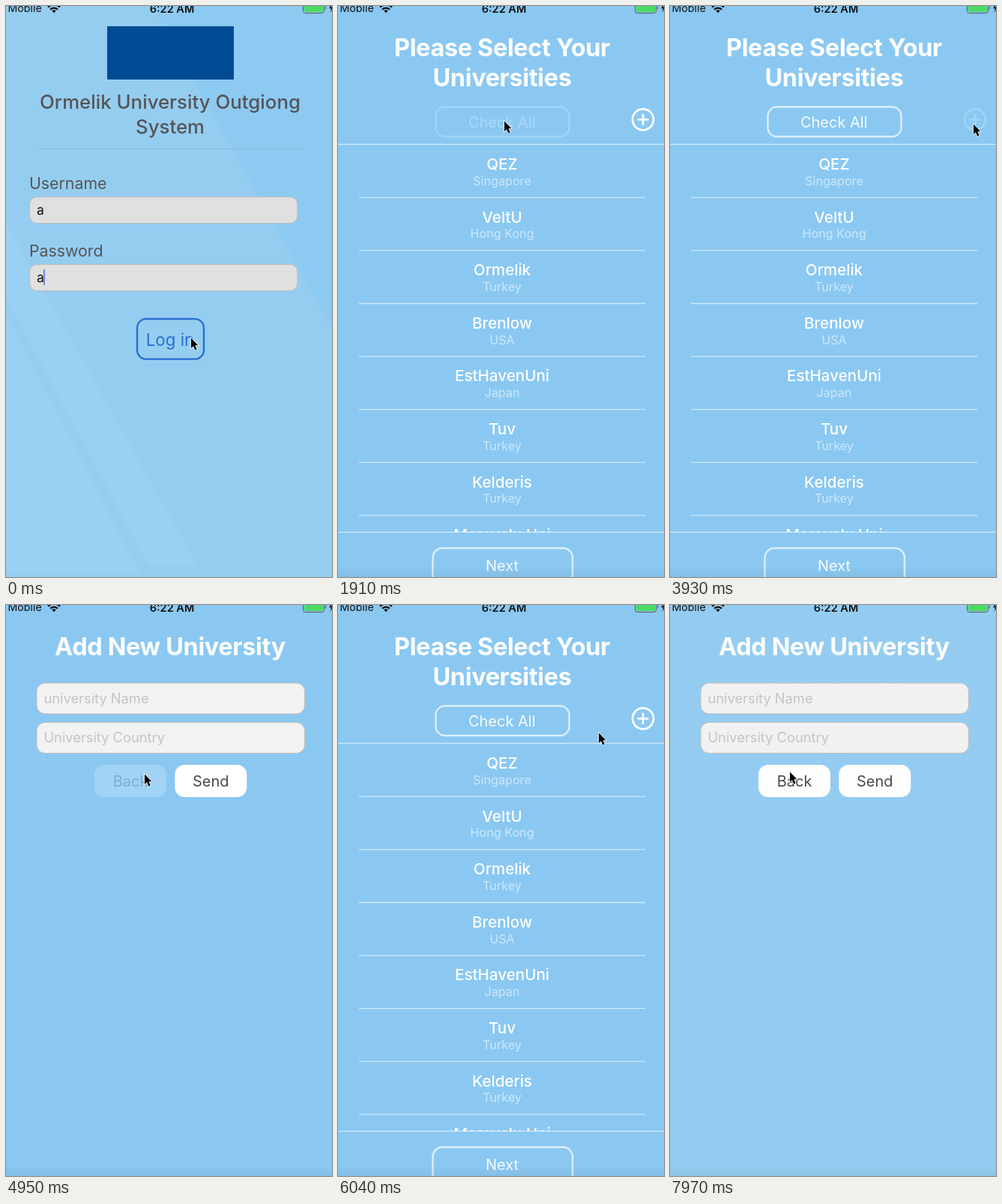
Recreate the animation shown at these times as an HTML page. Size 435x761 px, loop 8000 ms.

```html
<!DOCTYPE html>
<html lang="en">
<head>
<meta charset="utf-8">
<title>University picker</title>
<style>
  html, body { margin: 0; height: 100%; overflow: hidden; background: #8ac8f2; }
  svg { display: block; width: 100vw; height: 100vh; font-family: Inter, Roboto, sans-serif; }
</style>
</head>
<body>
<svg id="stage" viewBox="0 0 435 761"></svg>
<script>
const LOOP = 8000, WIDTH = 448, LEFT = -5, ROW = 70.6;
const SKY = '#8ac8f2', PALE = '#95cdf1';

// y is the vertical middle of the capitals
function text(s, x, y, size, fill, weight = 400, anchor = 'middle') {
  const spacing = weight === 700 ? -0.01 * size : 0;
  return `<text x="${x}" y="${y + size * 0.36}" font-size="${size}" fill="${fill}" font-weight="${weight}"
    text-anchor="${anchor}" letter-spacing="${spacing}">${s}</text>`;
}
function box(x, y, w, h, r, fill, stroke = 'none', line = 1) {
  return `<rect x="${x}" y="${y}" width="${w}" height="${h}" rx="${r}" fill="${fill}" stroke="${stroke}" stroke-width="${line}"/>`;
}
const path = (d, attrs) => `<path d="${d}" ${attrs}/>`;
const group = (id, body, attrs = '') => `<g id="${id}" ${attrs}>${body}</g>`;
const page = (id, fill) => `<rect id="${id}" x="${LEFT}" y="-5" width="${WIDTH}" height="775" fill="${fill}"/>`;
const outlined = 'fill="none" stroke-linecap="round" stroke-linejoin="round"';
const bottomShade = `<rect x="${LEFT}" y="746" width="${WIDTH}" height="15" fill="url(#fadeDown)"/>`;

const login = page('loginPage', PALE)
  + path('M195 0H443V445Z', 'fill="#8dcaf2"')
  + path('M-5 281L255 745H190L-5 380ZM-5 400L178 755H-5Z', 'fill="#9ad0f2"')
  + box(135, 27, 169, 71, 0, '#004b93')
  + text('Ormelik University Outgiong', 219, 128, 25.8, '#555', 500)
  + text('System', 219, 160.5, 25.8, '#555', 500)
  + path('M40 190.5H400', 'stroke="#8bbbdb"')
  + [['Username', 236], ['Password', 326]].map(([label, y]) =>
      text(label, 31, y, 21.3, '#555', 400, 'start')
      + box(31.5, y + 18.5, 357.5, 35, 10, '#e0e0e0', '#bbb')
      + text('a', 41, y + 36, 17.5, '#111', 400, 'start')).join('')
  + path('M51 351V372', 'stroke="#5b6fe0" stroke-width="1.6"')
  + group('logInButton', box(175, 417, 89, 53.6, 12, 'none', '#2a6fd0', 2.4)
      + text('Log in', 219, 444.5, 22.3, '#2a6fd0'));

const universities = [
  ['QEZ', 'Singapore'], ['VeltU', 'Hong Kong'], ['Ormelik', 'Turkey'], ['Brenlow', 'USA'],
  ['EstHavenUni', 'Japan'], ['Tuv', 'Turkey'], ['Kelderis', 'Turkey'], ['Marovelu Uni', 'Turkey']
];
const rows = universities.map(([name, country], i) => {
  const y = i * ROW;
  return text(name, 219, 210.5 + y, 20.6, '#fff', 500)
    + text(country, 219, 233 + y, 16.2, 'rgba(255,255,255,.58)')
    + path(`M28 ${255.3 + y}H410`, 'stroke="#fff" stroke-opacity=".6" stroke-width="1.3"');
}).join('');
const ticks = universities.map((_, i) => {
  const y = 219.5 + i * ROW;
  return `<circle cx="374" cy="${y}" r="12.8" fill="none" stroke="#fff" stroke-width="2.2"/>`
    + path(`M368 ${y}l4.5 4.5l8 -9`, `${outlined} stroke="#fff" stroke-width="2.2"`);
}).join('');

const select = `<rect x="${LEFT - 10}" y="0" width="10" height="761" fill="url(#edge)"/>`
  + page('selectPage', SKY)
  + text('Please Select Your', 219, 55, 32.4, '#fff', 700)
  + text('Universities', 219, 95, 32.4, '#fff', 700)
  + group('checkAll', box(130.5, 134.5, 178, 39.5, 12, 'none', 'rgba(255,255,255,.7)', 2.4)
      + text('Check All', 218.7, 154.5, 20, 'rgba(255,255,255,.92)'))
  + group('plus', `<circle cx="407" cy="151.3" r="14" fill="none" stroke="#fff" stroke-width="2.7"/>`
      + path('M400.5 151.3h13M407 144.8v13', `${outlined} stroke="#fff" stroke-width="2.7"`))
  + group('wait', text('Please wait...', 203.5, 271, 20.3, 'rgba(255,255,255,.9)'))
  + group('list', rows + group('ticks', ticks), 'clip-path="url(#listArea)"')
  + path(`M${LEFT} 184.3H443M${LEFT} 701.3H443`, 'stroke="#fff" stroke-opacity=".6" stroke-width="1.3"')
  + box(126.5, 722.5, 186.5, 49, 13, 'none', 'rgba(255,255,255,.7)', 2.4)
  + text('Next', 219, 746, 20, 'rgba(255,255,255,.92)')
  + bottomShade;

const field = (label, y) => box(41, y, 357.5, 41, 11, '#f2f2f2', '#c4beb8')
  + text(label, 50.5, y + 20, 18.3, '#c4c4c4', 400, 'start');
const whiteButton = (label, x) => box(x, 213, 96, 43, 13, '#fff') + text(label, x + 48, 234.5, 20, '#4a4a4a');
const add = page('addPage', SKY)
  + text('Add New University', 219, 55, 32.4, '#fff', 700)
  + field('university Name', 104) + field('University Country', 156.5)
  + group('back', whiteButton('Back', 118)) + whiteButton('Send', 225.3)
  + bottomShade;

const statusBar = text('Mobile', 2.5, 3.3, 14.2, '#111', 400, 'start')
  + text('6:22 AM', 221.5, 3.3, 14.5, '#111', 600)
  + path('M56 1.5Q64 -5 72 1.5M59 4.6Q64 .6 69 4.6', 'fill="none" stroke="#111" stroke-width="2.3"')
  + path('M64 9.2L61.2 6.3Q64 4.2 66.8 6.3Z', 'fill="#111"')
  + box(396.5, -6, 28, 15.5, 3, 'none', '#555') + box(398, -5, 25, 13, 1.5, '#4cd964')
  + path('M426 0q2.5 2.5 0 5Z', 'fill="#555"')
  + path('M435 -3L431 3.3H434L432.5 9L437 1.5H434Z', 'fill="#111"');

const pointer = path('M0 .5V14L3 11.2L5.2 16.4L7.6 15.4L5.4 10.3H9.4Z',
  'fill="#000" stroke="#fff" stroke-width="1.4" paint-order="stroke"');

const stage = document.getElementById('stage');
stage.innerHTML = `<defs>
    <linearGradient id="edge"><stop stop-opacity="0"/><stop offset="1" stop-opacity=".18"/></linearGradient>
    <linearGradient id="fadeDown" x2="0" y2="1"><stop stop-opacity="0"/><stop offset="1" stop-opacity=".05"/></linearGradient>
    <clipPath id="listArea"><rect x="${LEFT}" y="185" width="${WIDTH}" height="516"/></clipPath>
  </defs>`
  + group('login', login)
  + `<rect id="dim" width="435" height="761" opacity="0"/>`
  + group('select', select) + group('add', add) + statusBar + group('cursor', pointer);

const el = id => document.getElementById(id);
const opacity = (id, value) => el(id).setAttribute('opacity', value);
const move = (id, x, y) => el(id).setAttribute('transform', `translate(${x} ${y})`);
const clamp = v => Math.max(0, Math.min(1, v));
const smooth = (t, from, to) => { const u = clamp((t - from) / (to - from)); return u * u * (3 - 2 * u); };
const between = (t, from, to) => t >= from && t < to;

// Touch feedback: drops at once, recovers after release
function touch(t, down, up) {
  if (t < down) return 1;
  return t < up ? 0.2 : 0.2 + 0.8 * clamp((t - up) / 150);
}

// time, x, y
const cursorPath = [
  [0, 247, 442], [950, 247, 442], [1320, 228, 177], [1530, 228, 177], [1640, 222, 153],
  [2900, 222, 153], [3280, 383, 157], [3630, 405, 157], [4080, 405, 157], [4660, 184, 225],
  [4710, 185, 225], [5250, 185, 225], [5570, 197, 287], [5790, 197, 287], [6040, 348, 170],
  [6300, 385, 166], [6610, 397, 170], [7400, 397, 170], [7550, 403, 160], [7790, 403, 160],
  [7970, 160, 222], [8000, 160, 222]
];
function cursorAt(t) {
  const i = cursorPath.findIndex(key => key[0] > t);
  const [t0, x0, y0] = cursorPath[i - 1], [t1, x1, y1] = cursorPath[i];
  const u = (t - t0) / (t1 - t0);
  return [x0 + (x1 - x0) * u, y0 + (y1 - y0) * u];
}

function draw(t) {
  // The new page pushes in from the right, the old one trails at 30 %
  const remaining = t < 480 ? 1 : t < 1000 ? Math.exp((480 - t) / 80) : 0;
  move('select', WIDTH * remaining + (remaining === 1 ? 20 : 0), 0);
  move('login', -0.3 * WIDTH * (1 - remaining), 0);
  opacity('dim', 0.1 * (1 - remaining));
  opacity('logInButton', touch(t, 50, 190));

  const loaded = t >= 1050;
  opacity('wait', loaded ? 0 : 1);
  opacity('list', loaded ? 1 : 0);
  opacity('ticks', between(t, 1960, 2900) ? 1 : 0);
  opacity('checkAll', Math.min(touch(t, 1650, 1890), touch(t, 2690, 2850)));
  opacity('plus', touch(t, 3870, 4000));

  opacity('add', smooth(t, 4050, 4290) - smooth(t, 5100, 5340) + smooth(t, 7740, 7980));
  opacity('back', touch(t, 4950, 5050));
  el('addPage').setAttribute('fill', between(t, 4050, 4450) || t > 7700 ? PALE : SKY);

  move('cursor', ...cursorAt(t));
}

const start = performance.now();
function frame() {
  draw((performance.now() - start) % LOOP);
  requestAnimationFrame(frame);
}
frame();
</script>
</body>
</html>
```
